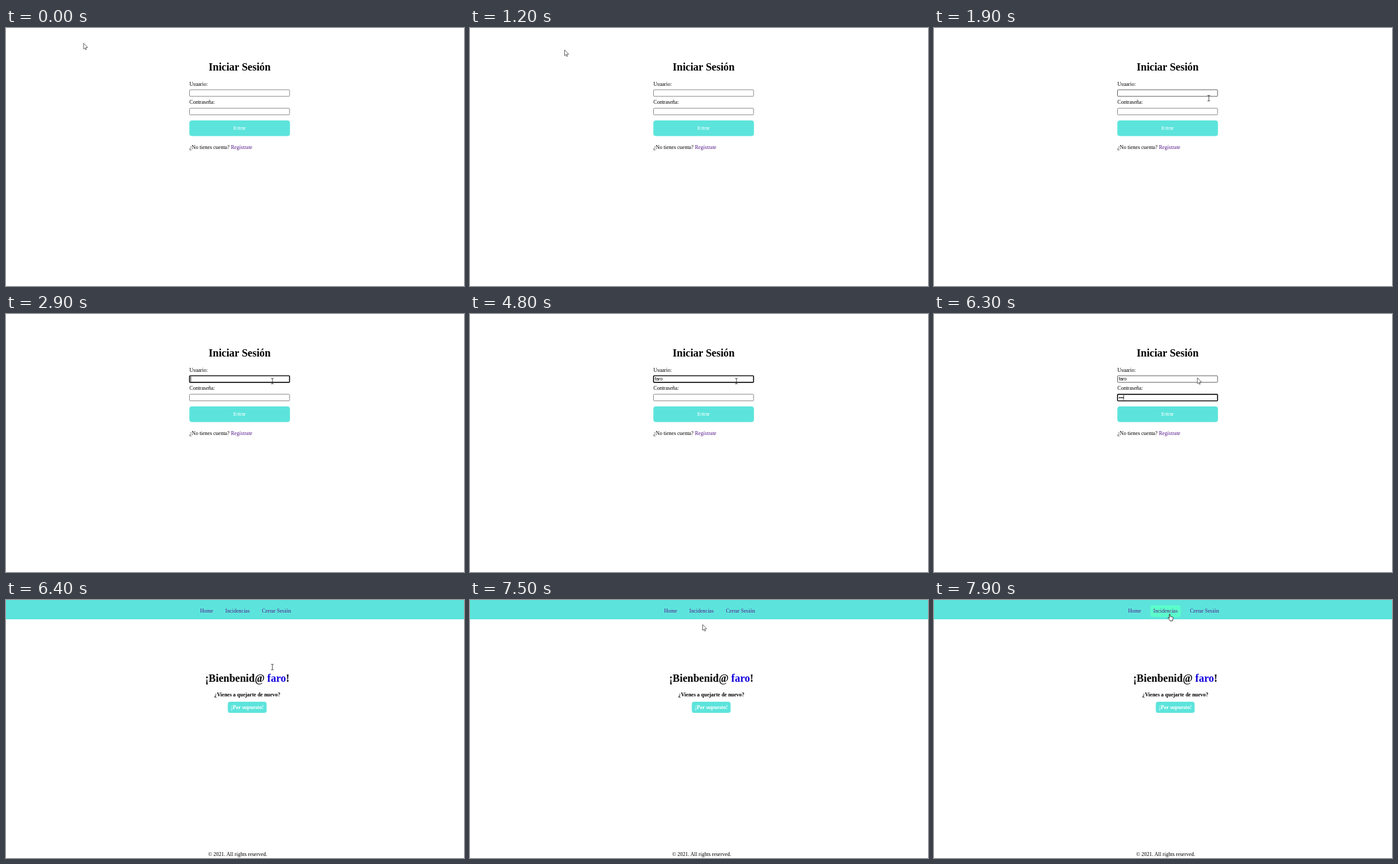
Recreate the animation shown at these times as an HTML page. Size 690x388 px, loop 8000 ms.

```html
<!DOCTYPE html>
<html lang="es">
<head>
<meta charset="utf-8">
<title>Iniciar Sesión</title>
<style>
  html, body { margin: 0; width: 100%; height: 100%; overflow: hidden; background: #fff; }
  svg { display: block; width: 100%; height: 100%; }
  text { font: 8px "Liberation Serif", "Times New Roman", serif; white-space: pre; }
  .title { font-size: 16px; font-weight: bold; }
  .bold { font-weight: bold; }
  .ui { font: 6.9px "Liberation Sans", Arial, sans-serif; }
  .mid { text-anchor: middle; }
  .link { fill: #551a8b; }
  .white { fill: #fff; }
  .teal { fill: #5ce4dc; }
  .field { fill: #fff; }
</style>
</head>
<body>
<svg viewBox="0 0 690 388" xmlns="http://www.w3.org/2000/svg">
  <rect width="690" height="388" fill="#fff"/>

  <g id="login">
    <text class="title mid" x="352" y="64.3">Iniciar Sesión</text>
    <text x="276.3" y="86.6">Usuario:</text>
    <rect id="userBox" class="field" x="276.5" y="92.9" width="150.7" height="9.9" rx="1"/>
    <text id="user" class="ui" x="278.3" y="100.3"></text>
    <text x="276.3" y="114.4">Contraseña:</text>
    <rect id="passBox" class="field" x="276.5" y="120.7" width="150.7" height="9.9" rx="1"/>
    <g id="dots"></g>
    <rect id="caret" width="0.7" height="7.6"/>
    <rect class="teal" x="276.2" y="139" width="151.6" height="23.6" rx="4"/>
    <text class="ui bold white mid" x="352" y="153.3">Entrar</text>
    <text x="276.3" y="182">¿No tienes cuenta? <tspan class="link">Regístrate</tspan></text>
  </g>

  <g id="home">
    <rect class="teal" width="690" height="29"/>
    <rect id="hover" x="326" y="8" width="45.6" height="17.4" rx="3.5" fill="#5cfccb"/>
    <text class="link" x="292.5" y="19.3">Home</text>
    <text class="link" x="330.6" y="19.3">Incidencias</text>
    <text class="link" x="385.6" y="19.3">Cerrar Sesión</text>
    <text class="title mid" x="363.5" y="122.5">¡Bienbenid@ <tspan id="guest" fill="#1100dd"></tspan>!</text>
    <text class="bold mid" x="363.5" y="144.6">¿Vienes a quejarte de nuevo?</text>
    <rect class="teal" x="334.2" y="153" width="58.4" height="16.7" rx="3.5"/>
    <text class="bold white mid" x="363.5" y="164.2">¡Por supuesto!</text>
    <text class="mid" x="349" y="384.5">© 2021. All rights reserved.</text>
  </g>

  <g id="cursor" stroke-linejoin="round" stroke-linecap="round">
    <path id="arrow" d="M.5 .3V8.7L2.4 7 3.7 9.8 4.9 9.2 3.7 6.5 6.2 6.3Z" fill="#fff" stroke="#333" stroke-width=".7"/>
    <path id="beam" d="M3.4 .8H4.6L5 1.2 5.4 .8H6.6M5 1.2V8.6M3.4 9H4.6L5 8.6 5.4 9H6.6" fill="none" stroke="#222" stroke-width=".75"/>
    <path id="hand" d="M2.6 6.4V1.2Q2.6 .4 3.3 .4T4 1.2V4L7.4 4.7Q8.6 5 8.5 6.2L7.8 9.2V10.6H3.6V9.4L.8 6.6Q.4 5.8 1.2 5.4Q2 5.6 2.6 6.4Z" fill="#fff" stroke="#222" stroke-width=".8"/>
  </g>
</svg>
<script>
const LOOP = 8000;
const NAME = "faro";
const $ = id => document.getElementById(id);
const show = (id, on) => $(id).setAttribute("visibility", on ? "visible" : "hidden");
const set = (el, attrs) => { for (const k in attrs) el.setAttribute(k, attrs[k]); };

// Pointer steps: start time, shape, x, y
const pointer = [
  [0, "arrow", 116.4, 23], [1200, "arrow", 142, 33], [1300, "arrow", 222, 70],
  [1400, "arrow", 286.5, 101], [1800, "beam", 372, 101], [1900, "beam", 409, 100.7],
  [2400, "beam", 402, 97], [2500, "beam", 396.3, 96], [6300, "arrow", 396.3, 96],
  [6400, "beam", 396.3, 96], [6500, "arrow", 396.3, 96], [7300, "beam", 397, 118],
  [7400, "arrow", 372, 56], [7500, "arrow", 350, 37], [7600, "arrow", 324, 30],
  [7700, "hand", 330, 22], [7800, "hand", 342, 21], [7900, "hand", 351.8, 20.8]
];

// Caret steps: start time, x (0 hides it), y
const caret = [
  [0, 0, 94], [2800, 278, 94], [3400, 0, 94], [3800, 280.4, 94], [4000, 284.2, 94],
  [4100, 286.5, 94], [4300, 290.3, 94], [4800, 0, 94], [5000, 278, 121.9],
  [5600, 0, 121.9], [5800, 283, 121.9], [6000, 285.5, 121.9]
];

const userKeys = [3800, 4000, 4100, 4300];
const passKeys = [5800, 5800, 6000];

const current = (steps, t) => steps.filter(s => s[0] <= t).pop();
const typed = (keys, t) => keys.filter(k => k <= t).length;

const dots = passKeys.map((_, i) => {
  const dot = document.createElementNS("http://www.w3.org/2000/svg", "circle");
  set(dot, { cx: 279.5 + i * 2.45, cy: 125.8, r: 0.95 });
  return $("dots").appendChild(dot);
});
$("guest").textContent = NAME;

function border(id, focused, hovered) {
  set($(id), {
    stroke: focused ? "#000" : hovered ? "#444" : "#767676",
    "stroke-width": focused ? 1.4 : 0.8
  });
}

function draw(t) {
  const inside = t >= 6400;
  $("login").style.display = inside ? "none" : "";
  $("home").style.display = inside ? "" : "none";

  border("userBox", t >= 2800 && t < 5000, t >= 1800);
  border("passBox", t >= 5000, false);
  $("user").textContent = NAME.slice(0, typed(userKeys, t));
  const count = typed(passKeys, t);
  dots.forEach((dot, i) => { dot.style.display = i < count ? "" : "none"; });

  const [, cx, cy] = current(caret, t);
  set($("caret"), { x: cx, y: cy });
  show("caret", cx > 0);

  const [, shape, x, y] = current(pointer, t);
  set($("cursor"), { transform: `translate(${x} ${y})` });
  for (const id of ["arrow", "beam", "hand"]) show(id, id === shape);
  show("hover", shape === "hand");
}

const start = performance.now();
function tick() {
  draw((performance.now() - start) % LOOP);
  requestAnimationFrame(tick);
}
tick();
</script>
</body>
</html>
```
